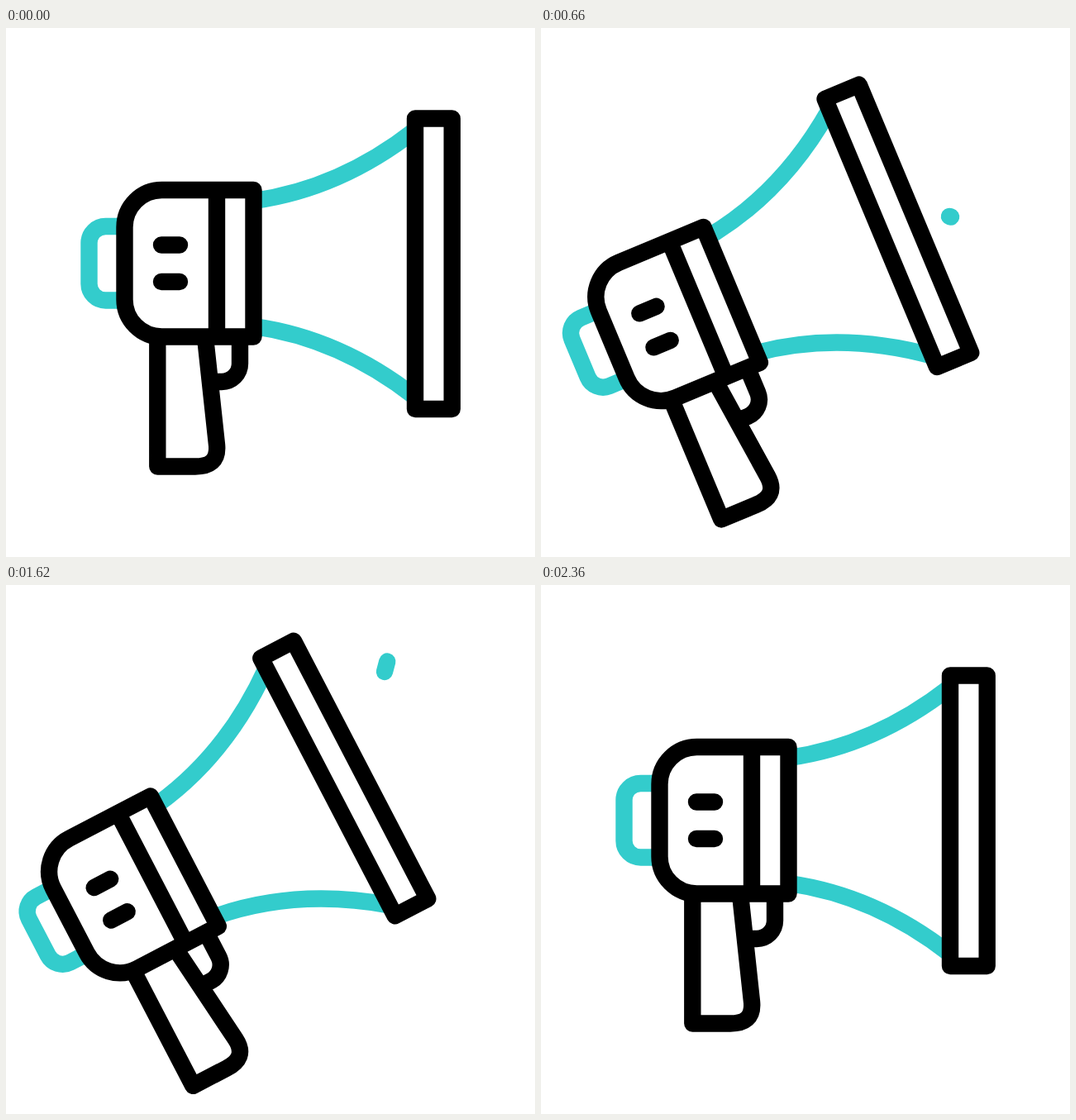
Recreate the animation shown at these times as an HTML page. Size 640x640 px, loop 2.4 s.

```html
<!DOCTYPE html>
<html lang="en">
<head>
<meta charset="utf-8">
<title>Megaphone</title>
<style>
  html, body { margin: 0; width: 100%; height: 100%; overflow: hidden; background: #fff; }
  svg { display: block; width: 100%; height: 100%; }
  path, g { fill: none; stroke-width: 20.4; stroke-linejoin: round; }
  .teal { stroke: #33cccc; }
  .black { stroke: #000; }
  .round { stroke-linecap: round; }
</style>
</head>
<body>
<svg viewBox="0 0 640 640">
  <g id="megaphone">
    <g class="teal">
      <path d="M143 240H120.5a20 20 0 0 0-20 20V309.5a20 20 0 0 0 20 20H143"/>
      <path d="M300 209Q404 194.5 495 123.5M300 361Q404 375.5 495 446.5"/>
    </g>
    <g class="black">
      <path d="M283 374V406a22 22 0 0 1-22 22H253"/>
      <path d="M183.3 374V530.5H229C246 530.5 257 524 255 504L241 374"/>
      <path d="M299.5 196V373.5H188.5a45 45 0 0 1-45-45V241a45 45 0 0 1 45-45ZM255 196V373.5"/>
      <path class="round" d="M188 262.5H210M188 307H210"/>
      <path d="M495 109.5H539.7V461H495Z"/>
    </g>
  </g>
  <g id="rays" class="teal round"></g>
</svg>
<script>
const LOOP = 2400, PEAK = 1200, REST = 2360;
const TILT = -31.5, SHIFT = [-9.3, 66], PIVOT = [245, 435];
const RAY_GROW = 220, RAY_CYCLE = 440;

const megaphone = document.getElementById('megaphone');
const rays = [
  { start: 620, from: [494, 228], to: [546, 240.3] },
  { start: 720, from: [473, 188], to: [529, 158] },
  { start: 820, from: [445, 154], to: [461.3, 92.5] }
];
for (const ray of rays) {
  ray.path = document.createElementNS('http://www.w3.org/2000/svg', 'path');
  document.getElementById('rays').append(ray.path);
}

// Symmetric ease: cubic-bezier(a, 0, 1 - a, 1)
function ease(x, a) {
  if (x <= 0) return 0;
  if (x >= 1) return 1;
  let low = 0, high = 1, s;
  for (let i = 0; i < 24; i++) {
    s = (low + high) / 2;
    const bx = 3 * (1 - s) * s * ((1 - s) * a + s * (1 - a)) + s ** 3;
    if (bx < x) low = s; else high = s;
  }
  return s * s * (3 - 2 * s);
}

function drawRay({ start, from, to, path }, t) {
  const age = t - start;
  if (age <= 0 || age >= 2 * RAY_CYCLE) return path.setAttribute('d', '');
  const phase = (age % RAY_CYCLE) / RAY_GROW;
  const point = k => from.map((v, i) => v + (to[i] - v) * k);
  path.setAttribute('d', `M${point(ease(phase - 1, 0.6))}L${point(ease(phase, 0.6))}`);
}

function draw(t) {
  const k = t < PEAK
    ? ease(t / PEAK, 0.82)
    : 1 - ease((t - PEAK) / (REST - PEAK), 0.82);
  megaphone.setAttribute('transform',
    `translate(${SHIFT.map(v => v * k)}) rotate(${TILT * k} ${PIVOT})`);
  rays.forEach(ray => drawRay(ray, t));
}

const begin = performance.now();
function frame() {
  draw((performance.now() - begin) % LOOP);
  requestAnimationFrame(frame);
}
frame();
</script>
</body>
</html>
```
